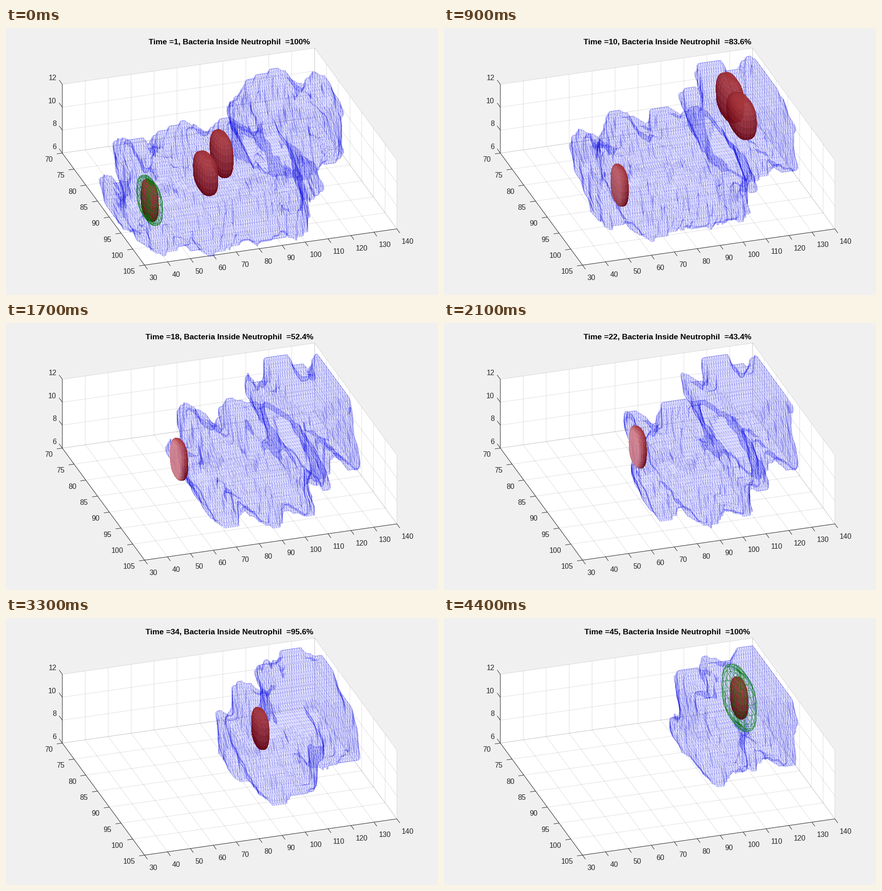
Write a matplotlib script that moves like this. It is 951 by 589 pixels and loops after 4500 ms.

```python
import numpy as np
import matplotlib.pyplot as plt
from matplotlib.animation import FuncAnimation
from matplotlib.collections import LineCollection, PolyCollection

W, H, DPI = 951, 589, 100
FRAMES, INTERVAL = 45, 100
PX = 72 / DPI
plt.rcParams["font.family"] = "Liberation Sans"

fig = plt.figure(figsize=(W / DPI, H / DPI), dpi=DPI, facecolor="#f0f0f0")
ax = fig.add_axes([0, 0, 1, 1])
ax.set(xlim=(0, W), ylim=(H, 0))
ax.axis("off")

# Orthographic view: screen steps for one unit along x, y and z.
CORNER = np.array([30, 70, 6])
BASIS = np.array([[5.05, -.727], [5.17, 7.06], [0, -25.3]])
VIEW = np.array([-1.02, 1, .31])  # from the scene towards the eye


def project(p):
    return np.array([124, 276]) + (np.asarray(p) - CORNER) @ BASIS


def draw_box():
    hull = [(30, 70, 12), (140, 70, 12), (140, 105, 12),
            (140, 105, 6), (30, 105, 6), (30, 70, 6)]
    ax.add_patch(plt.Polygon(project(hull), fc="white", ec="none", zorder=0))
    grid, axes = [], []

    def lines(*paths):
        grid.extend(project(path) for path in paths)

    def tick(at, step, value, dx, dy, ha):
        p = project(at)
        axes.append([p, p + step])
        ax.text(p[0] + dx, p[1] + dy, str(value), size=16 * PX, color="#262626",
                ha=ha, va="center_baseline")

    for x in range(30, 141, 10):
        lines([(x, 70, 12), (x, 70, 6), (x, 105, 6)])
        tick((x, 105, 6), (6.5, 9), x, 10.5, 27, "left")
    for y in range(70, 106, 5):
        lines([(140, y, 12), (140, y, 6), (30, y, 6)])
        tick((30, y, 6), (-12, 1.7), y, -21, 13, "right")
    for z in range(6, 13, 2):
        lines([(30, 70, z), (140, 70, z), (140, 105, z)])
        tick((30, 70, z), (-7, -9.5), z, -13, -15, "right")
    axes.append(project([(30, 70, 12), (30, 70, 6), (30, 105, 6), (140, 105, 6)]))
    ax.add_collection(LineCollection(grid, colors=(.15, .15, .15, .15), linewidths=PX, zorder=1))
    ax.add_collection(LineCollection(axes, colors="#262626", linewidths=PX, zorder=1))


draw_box()
title = ax.text(491.5, 36, "", size=17.4 * PX, weight="bold", ha="center", va="baseline")

X, Y, Z = np.meshgrid(np.arange(30, 141), np.arange(70, 106), np.arange(6, 12), indexing="ij")
rng = np.random.default_rng(4)
WAVES = rng.uniform((.1, -.5, .6, 0, -.3), (.4, .5, 1.8, 6.3, .3), (9, 5))


def noise(t):
    """Smooth, slowly drifting field with unit spread, plus fine grain."""
    waves = sum(np.sin(kx * X + ky * Y + kz * Z + phase + drift * t)
                for kx, ky, kz, phase, drift in WAVES)
    grain = np.random.default_rng(t).normal(0, .2, X.shape)
    return waves / np.sqrt(len(WAVES) / 2) + grain


def lobe(left, right, y, depth):
    mid, half = (left + right) / 2, (right - left) / 2
    return np.abs((X - mid) / half) ** 3 + np.abs((Y - y) / depth) ** 3


def cell(t):
    """Two joined lobes: the tail of the front one is drawn in over time."""
    start = min(1, (t - 1) / 5)
    front = lobe(np.interp(t, [1, 6, 10, 27, 45], [30, 46, 48, 80, 98]),
                 110 + 10 * min(1, (t - 1) / 26),
                 np.interp(t, [1, 6, 27, 45], [94, 90.5, 90, 82]),
                 11.5 - 2.5 * t / 45)
    rear = lobe(97 + 8 * start + 9 * t / 45, 138 + 10 * start, 79.5 - start, 8 + 2.5 * start)
    return np.minimum(front, rear) + np.abs((Z - 8.5) / 3.2) ** 4 + .27 * noise(t) < 1


def surface(solid):
    """Surface net round a voxel solid, as 3D triangles."""
    vol = np.pad(solid, 1)
    n = np.array(vol.shape) - 1
    total, count = np.zeros((*n, 3)), np.zeros(n)
    unit = np.eye(3, dtype=int)
    for axis in range(3):
        flips = np.diff(vol, axis=axis)
        u, v = np.delete(unit, axis, 0)
        for du, dv in np.ndindex(2, 2):
            shift = du * u + dv * v
            part = flips[tuple(slice(s, s + m) for s, m in zip(shift, n))]
            total += part[..., None] * (shift + .5 * unit[axis])
            count += part
    spots = np.moveaxis(np.indices(n), 0, -1) + total / np.maximum(count, 1)[..., None]
    points = spots + CORNER - 1
    points[..., 2] = np.clip(points[..., 2], 6, 12)

    tris = []
    for axis in range(3):
        at = np.argwhere(np.diff(vol, axis=axis))
        u, v = np.delete(unit, axis, 0)
        a, b, c, d = (points[tuple(q.T)] for q in (at - u - v, at - v, at, at - u))
        tris += [np.stack([a, b, d], 1), np.stack([b, c, d], 1)]
    return np.concatenate(tris)


# Rounded boxes: unit directions and shape, shared by all red and green bodies.
def rounded(v):
    return np.sign(v) * np.abs(v) ** .75


LON, LAT = np.meshgrid(np.linspace(0, 2 * np.pi, 25), np.linspace(-np.pi / 2, np.pi / 2, 13))
SPHERE = np.stack([np.cos(LAT) * np.cos(LON), np.cos(LAT) * np.sin(LON), np.sin(LAT)], -1)
SHAPE = np.stack([rounded(np.cos(LAT)) * rounded(np.cos(LON)),
                  rounded(np.cos(LAT)) * rounded(np.sin(LON)), rounded(np.sin(LAT))], -1)


def quads(net):
    return np.stack([net[:-1, :-1], net[:-1, 1:], net[1:, 1:], net[1:, :-1]], 2).reshape(-1, 4, net.shape[-1])


FACING = quads(SPHERE).mean(1)
DARK, LIGHT, PALE = np.array([(100, 2, 16), (196, 78, 80), (226, 150, 160)]) / 255


def net(centre, radii):
    return quads(project(centre + SHAPE * radii))


def body(centre, radii, pale=0):
    """Visible faces of a red body with their colours."""
    seen = (FACING / radii) @ VIEW > 0
    n = FACING[seen]
    shine = np.clip(.12 + n @ (-.1, .2, .55), 0, 1)[:, None]
    fade = pale * np.clip(.2 - n[:, :1], 0, .8)
    colour = (DARK + (LIGHT - DARK) * shine) * (1 - fade) + PALE * fade
    return net(centre, radii)[seen], np.c_[colour, np.full(len(n), .88)]


def along(t, times, *coords):
    return np.array([np.interp(t, times, c) for c in coords])


level_mesh = PolyCollection([], facecolors=(0, 0, 1, .025), edgecolors=(0, 0, 1, .13),
                            linewidths=.5 * PX, joinstyle="bevel", zorder=2)
steep_mesh = PolyCollection([], facecolors=(0, 0, .9, .045), edgecolors=(0, 0, .9, .2),
                            linewidths=.5 * PX, joinstyle="bevel", zorder=3)
reds = PolyCollection([], linewidths=0, antialiaseds=False, zorder=4)
cage = PolyCollection([], facecolors="none", edgecolors=(0, .48, .05, .7),
                      linewidths=.5 * PX, joinstyle="bevel", zorder=5)
for item in (level_mesh, steep_mesh, reds, cage):
    ax.add_collection(item, autolim=False)


def draw(frame):
    t = frame + 1
    share = np.interp(t, [8, 10, 18, 27, 34, 44], [100, 83.6, 52.4, 32.1, 95.6, 100])
    title.set_text(f"Time ={t}, Bacteria Inside Neutrophil  ={share:.3g}%")

    tris = surface(cell(t))
    steep = np.ptp(tris[..., 2], axis=1) > .2
    flat = project(tris)
    level_mesh.set_verts(flat[~steep])
    steep_mesh.set_verts(flat[steep])

    microbe = along(t, [1, 6, 18, 27, 34, 45], [42.5, 57, 64.5, 91, 104, 129],
                    [95, 95, 86, 80, 82, 75], [8.5] * 6)
    bodies = [body(microbe, np.array([2.7, 2.3, 1.65]), np.interp(t, [6, 14, 28, 33], [0, 1, 1, 0]))]
    if t < 14:  # the nucleus: two blocks that merge
        times, grow = [1, 6, 10], np.interp(t, [6, 10], [1, 1.2])
        upper = along(t, times, [82, 124, 125], [87, 75, 75], [9.2, 10, 9.5])
        lower = along(t, times, [74, 124, 126], [88, 81, 79], [8, 8.5, 9])
        bodies += [body(upper, np.array([3.6 * grow, 3 * grow, 1.8])),
                   body(lower, np.array([3.8 * grow, 3.2 * grow, 1.6]))]
    verts, colours = (np.concatenate(part) for part in zip(*bodies))
    reds.set_verts(verts)
    reds.set_facecolor(colours)

    size = np.interp(t, [1, 5, 7, 40, 41, 45], [1, .45, 0, 0, .8, 1])
    radii = size * (1 + .35 * t / 45) * np.array([3.2, 4, 1.7])
    cage.set_verts(net(microbe - (0, 0, 1 - size), radii) if size else [])
    return title, level_mesh, steep_mesh, reds, cage


anim = FuncAnimation(fig, draw, frames=FRAMES, interval=INTERVAL, repeat=True, repeat_delay=0)
plt.show()
```
